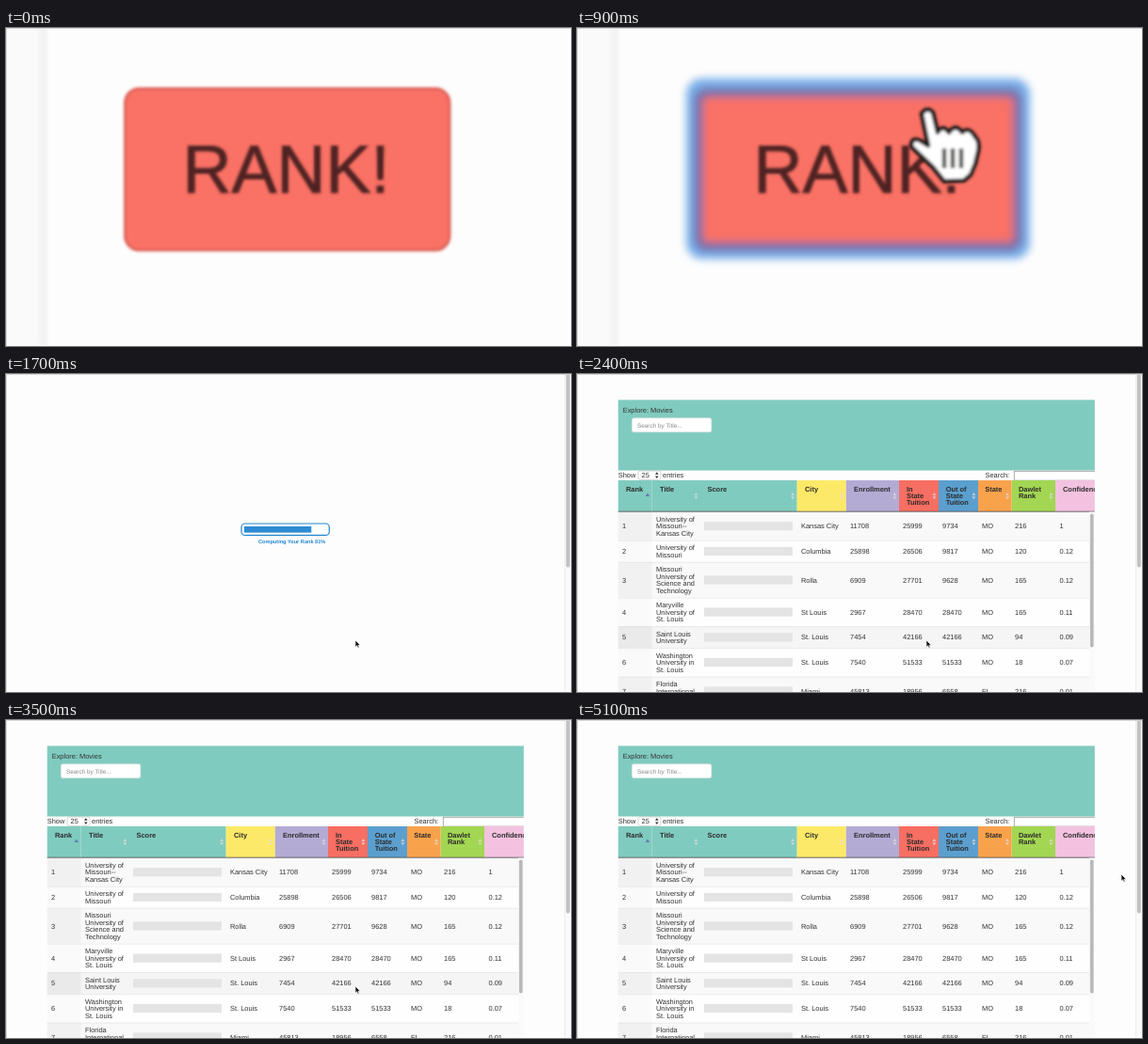
An HTML page for the animation above (5200 ms loop, 600x338 px).

```html
<!DOCTYPE html>
<html lang="en">
<head>
<meta charset="utf-8">
<title>Rank</title>
<style>
  html, body { margin: 0; width: 100%; height: 100%; overflow: hidden; background: #fdfdfd; }
  svg { display: block; width: 600px; height: 338px; }
  text { font-family: "Liberation Sans", Arial, sans-serif; font-size: 7.45px; fill: #333; text-rendering: geometricPrecision; }
  .head text { font-weight: bold; fill: #2b2b2b; }
  #label { font-size: 72px; fill: #4f2321; stroke: #4f2321; stroke-width: 1; }
</style>
</head>
<body>
<svg viewBox="0 0 600 338">
  <defs>
    <filter id="soft" x="-20%" y="-20%" width="140%" height="140%"><feGaussianBlur stdDeviation="1.5"/></filter>
    <filter id="glow" x="-20%" y="-20%" width="140%" height="140%"><feGaussianBlur stdDeviation="4"/></filter>
    <pattern id="hatch" width="2" height="2" patternUnits="userSpaceOnUse">
      <rect width="2" height="2" fill="#2286d2"/><path d="M0 2L2 0" stroke="#4b9ddb" stroke-width=".5"/>
    </pattern>
    <clipPath id="frame"><rect x="43.5" y="27" width="506.3" height="311"/></clipPath>
    <path id="arrow" d="M0 0V7.2L1.7 5.7L2.8 8.2L4 7.7L2.9 5.2H5.2Z"/>
  </defs>

  <g id="zoom">
    <rect width="600" height="338" fill="#fdfdfd"/>
    <rect width="36" height="338" fill="#fafafa"/>
    <rect x="35" width="9" height="338" fill="#f4f3f3" filter="url(#soft)"/>
    <g id="plain" filter="url(#soft)">
      <rect x="126.5" y="64.5" width="344.5" height="171.5" rx="15" fill="#fa7165" stroke="#de645b" stroke-width="3"/>
    </g>
    <g id="ring" filter="url(#glow)">
      <rect x="116" y="53.5" width="365" height="192" rx="17" fill="#78aeea"/>
      <rect x="129" y="68.5" width="339" height="164" rx="9" fill="#fa7165" stroke="#7870a8" stroke-width="10"/>
    </g>
    <text id="label" x="187.5" y="175.3" filter="url(#soft)">RANK!</text>
    <g id="hand" filter="url(#soft)">
      <path d="M-7 5Q-1 -3 5 4L10 25Q15 16 22 25Q29 15 36 25Q43 18 50 30Q55 35 53 45L50 58L45 70L38 76L17 77L5 62L-18 40Q-18 29 -8 34L0 39Z"
        fill="#fff" stroke="#1c1517" stroke-width="4.5" stroke-linejoin="round"/>
      <path d="M17 42V63M26 42V63M35 42V63" stroke="#5c5756" stroke-width="4.5"/>
    </g>
    <use id="bigArrow" href="#arrow" fill="#111" stroke="#fff" stroke-width=".6" filter="url(#soft)"/>
  </g>

  <g id="page">
    <rect width="600" height="338" fill="#fdfdfd"/>
    <rect x="593" width="7" height="338" fill="#fafafa"/>
    <path d="M593.5 0V338" stroke="#ececec"/>
    <rect x="594.8" y="-5" width="4" height="210.5" rx="2" fill="#c1c1c1"/>
    <g id="load">
      <rect x="250" y="159" width="93.3" height="12.4" rx="4" fill="#fff" stroke="#2286d2" stroke-width="1.2"/>
      <rect id="fill" x="253" y="162" height="6.6" fill="url(#hatch)"/>
      <text id="pct" x="268" y="179.8" style="font-size:5.6px;font-weight:bold;fill:#2286d2"></text>
    </g>
    <g id="table" clip-path="url(#frame)"></g>
    <use id="mouse" href="#arrow" fill="#111" stroke="#fff" stroke-width=".6"/>
  </g>
  <path d="M0 .5H600M.5 0V338" stroke="#d6d6d6" fill="none"/>
</svg>
<script>
const $ = id => document.getElementById(id);
const LOOP = 5200, STEP = 100, LINE = 7.45;
const RING = 900, PAGE = 1300, TABLE = 2100;

const rect = (x, y, w, h, fill, more = '') =>
  `<rect x="${x}" y="${y}" width="${w}" height="${h}" fill="${fill}" ${more}/>`;
const text = (x, y, s, more = '') => `<text x="${x}" y="${y}" ${more}>${s}</text>`;
const lines = (x, y, s) => s.split('|').map((t, i) => text(x, y + i * LINE, t)).join('');

// left edge, label, label x, colour
const heads = [
  [43.5, 'Rank', 52, '#80cbbf'], [79.5, 'Title', 88, '#80cbbf'], [131, 'Score', 138.5, '#80cbbf'],
  [233.7, 'City', 242, '#fde968'], [285.8, 'Enrollment', 294, '#b4abd5'],
  [342, 'In|State|Tuition', 350, '#f76e62'], [384, 'Out of|State|Tuition', 391.7, '#5b9fcf'],
  [426, 'State', 433.3, '#f9a24c'], [461.7, 'Dawlet|Rank', 469, '#a3d653'],
  [508, 'Confidence', 516, '#f3c2e0']
];
const cellX = [48, 84, 238, 290, 346, 388, 430, 465, 512.5];
const data = [
  'University of|Missouri--|Kansas City;Kansas City;11708;25999;9734;MO;216;1',
  'University of|Missouri;Columbia;25898;26506;9817;MO;120;0.12',
  'Missouri|University of|Science and|Technology;Rolla;6909;27701;9628;MO;165;0.12',
  'Maryville|University of|St. Louis;St Louis;2967;28470;28470;MO;165;0.11',
  'Saint Louis|University;St. Louis;7454;42166;42166;MO;94;0.09',
  'Washington|University in|St. Louis;St. Louis;7540;51533;51533;MO;18;0.07',
  'Florida|International|University;Miami;45813;18956;6558;FL;216;0.01'
];

const rows = [];
function buildTable() {
  let out = rect(43.5, 27.5, 507, 75, '#80cbbf') + text(48.7, 41, 'Explore: Movies') +
    rect(58.3, 46.8, 84.5, 15, '#fff', 'rx="2" stroke="#d3dcda" stroke-width=".6"') +
    text(64, 56.8, 'Search by Title...', 'style="font-size:6.4px;fill:#888"') +
    text(43.7, 110, 'Show') + rect(65, 103, 24, 9.3, '#fff', 'rx="2" stroke="#bbb" stroke-width=".6"') +
    text(68.5, 110.2, '25') + '<path d="M83 106.8l1.8-2.5 1.8 2.5zM83 108.6l1.8 2.5 1.8-2.5z" fill="#333"/>' +
    text(91, 110, 'entries') + text(433.5, 110, 'Search:') +
    rect(464.3, 103.3, 100, 9.8, '#fff', 'stroke="#999" stroke-width=".8"');

  let y = 146.5;
  data.forEach((d, i) => {
    const cells = d.split(';'), n = cells[0].split('|').length;
    const h = 8.1 + n * LINE, mid = y + h / 2;
    rows.push({ y, h, odd: i % 2 === 0 });
    out += rect(43.5, y, 507, h, '#fff', `id="row${i}"`) + rect(43.5, y, 36, h, '#fff', `id="sort${i}"`) +
      `<path d="M43.5 ${y + .3}H550" stroke="#ddd" stroke-width=".6"/>` +
      rect(135, mid - 4.6, 94, 9.2, '#e4e4e4') + text(cellX[0], mid + 2.6, i + 1);
    cells.forEach((c, k) => {
      out += lines(cellX[k + 1], k ? mid + 2.6 : mid + 2.6 - (n - 1) * LINE / 2, c);
    });
    y += h;
  });

  out += '<g class="head">';
  heads.forEach(([x, label, tx, fill], i) => {
    const right = i < 9 ? heads[i + 1][0] : 575;
    out += rect(x, 113, right - x, 33, fill) + lines(tx, 124.5, label);
    const a = right - 4.6;
    out += i
      ? `<path d="M${a - 2} 129l2-3 2 3zM${a - 2} 130.3l2 3 2-3z" fill="#ddd" opacity=".75"/>`
      : `<path d="M${a - 2.2} 130l2.2-3.4 2.2 3.4z" fill="#6177b8"/>`;
  });
  out += '</g><path d="M43.5 146.2H550" stroke="#333" stroke-width=".7"/>' +
    rect(543.8, 146.6, 6, 192, '#fafafa') + rect(544.9, 148.5, 3.7, 142, '#b9b9b9', 'rx="1.8"');
  $('table').innerHTML = out;
}

// Linear position along [time, x, y] steps
function along(path, t) {
  let i = 0;
  while (i < path.length - 2 && t > path[i + 1][0]) i++;
  const [a, b] = [path[i], path[i + 1]];
  const p = Math.min(1, Math.max(0, (t - a[0]) / (b[0] - a[0])));
  return [a[1] + (b[1] - a[1]) * p, a[2] + (b[2] - a[2]) * p];
}
const handPath = [[400, 406, 65], [500, 393, 66], [600, 388, 71], [800, 373, 86], [1200, 373, 86]];
const mousePath = [[3600, 371, 283], [3700, 376, 288], [3800, 410, 267], [3900, 450, 240],
  [4000, 484, 221], [4100, 501, 213.5], [4300, 512, 208], [4800, 556, 180], [5100, 578, 164]];

const show = (id, on) => $(id).style.display = on ? '' : 'none';
const move = (id, [x, y], scale = 1) =>
  $(id).setAttribute('transform', `translate(${x} ${y}) scale(${scale})`);

function draw(t) {
  show('zoom', t < PAGE);
  show('page', t >= PAGE);
  if (t < PAGE) {
    show('plain', t < RING);
    show('ring', t >= RING);
    show('bigArrow', t >= 300 && t < 400);
    show('hand', t >= 400);
    move('bigArrow', [434, 24], 8.5);
    move('hand', along(handPath, t));
    return;
  }
  const pct = Math.min(100, Math.round(81 * (t - PAGE) / 400));
  show('load', t < TABLE);
  show('table', t >= TABLE);
  $('fill').setAttribute('width', .88 * pct);
  $('pct').textContent = `Computing Your Rank ${pct}%`;
  const [x, y] = along(mousePath, t);
  move('mouse', [x, y]);
  rows.forEach((r, i) => {
    const over = x < 550 && y >= r.y && y < r.y + r.h;
    $('row' + i).setAttribute('fill', over ? '#f5f5f5' : r.odd ? '#f9f9f9' : '#fefefe');
    $('sort' + i).setAttribute('fill', over ? '#eaeaea' : r.odd ? '#f1f1f1' : '#fafafa');
  });
}

buildTable();
const start = performance.now();
function tick() {
  const t = (performance.now() - start) % LOOP;
  draw(Math.floor(t / STEP) * STEP);
  requestAnimationFrame(tick);
}
tick();
</script>
</body>
</html>
```
